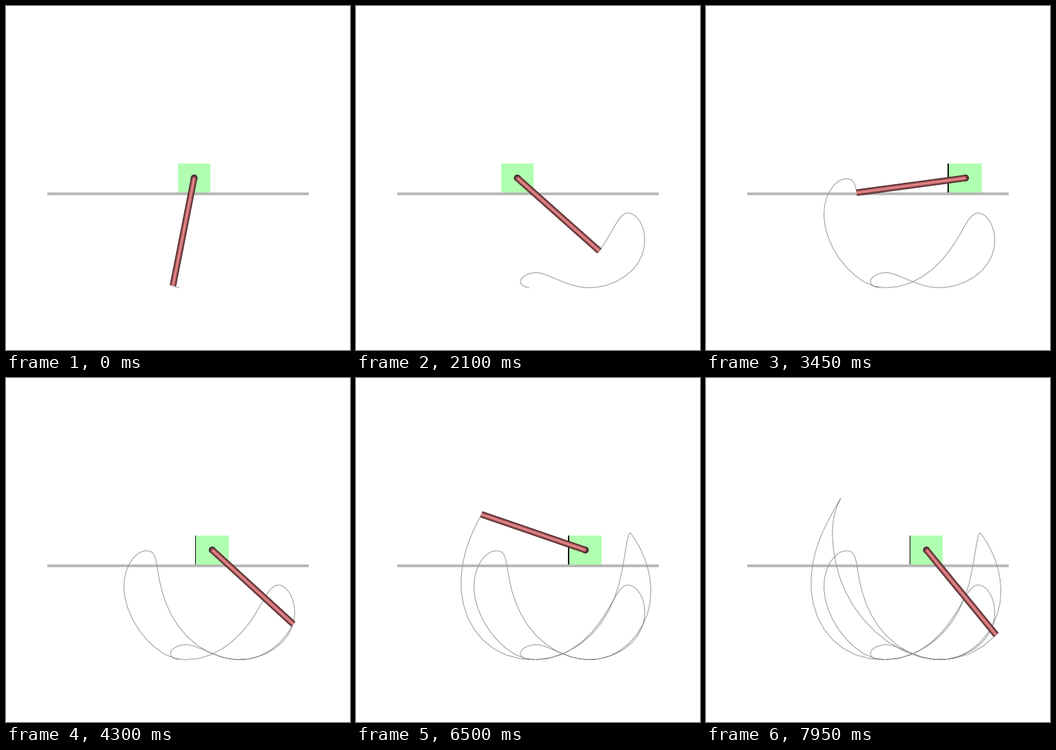
These frames come from a looping animation (500x500 px, 8000 ms). A matplotlib script:

```python
import numpy as np
import matplotlib.pyplot as plt
from matplotlib.animation import FuncAnimation
from matplotlib.patches import Circle, Rectangle

SIZE, DPI = 500, 100
STEP, FRAMES = 50, 160          # ms per frame, frames per loop
PX = 72 / DPI                   # points per pixel
PIVOT_Y, LENGTH = 250, 159.5
CART_W, CART_TOP, CART_H = 47.6, 228.5, 42.5

# the rod hangs straight at each LOW time and turns at each PEAK time (ms)
LOW = [-80, 973, 2393, 4015, 5758, 7765]
PEAK = [505, 1750, 3226, 4937, 6800, 8676]
SWING = np.radians([-30.4, 71.4, -89.6, 99, -118, 120])

# the cart's turns and changes of pace: time in ms, centre in px
CART = np.array([
    (-100, 251), (50, 273.5), (505, 343), (735, 353.3), (1150, 320.5),
    (1750, 244), (1950, 232.5), (2400, 263.5), (2560, 291), (2860, 322),
    (3430, 377), (3900, 352.5), (4290, 301), (4800, 244), (5000, 239.5),
    (5300, 230), (5762, 257), (6500, 333.3), (6800, 336.5), (7115, 338.5),
    (7330, 348), (7650, 350), (7950, 320.5),
])


def rod_angle(t):
    """Pendulum swing: slow near the peaks, slower still for high ones."""
    turns = np.ravel(list(zip(LOW, PEAK)))
    phase = np.interp(t, turns, np.tile([1, 0], len(LOW)))
    i = np.maximum(np.searchsorted(LOW, t, side="right") - 1, 0)
    power = 1.1 + 0.01 * SWING[i] ** 4
    swing = np.cos(np.pi / 2 * phase ** power)
    return 2 * np.arcsin(np.sin(SWING[i] / 2) * swing)


def smooth_path(t, kt, kv):
    """Cubic Hermite curve through the key points."""
    slope = np.gradient(kv, kt)
    i = np.clip(np.searchsorted(kt, t, side="right") - 1, 0, len(kt) - 2)
    h = kt[i + 1] - kt[i]
    u = (t - kt[i]) / h
    return ((1 + 2 * u) * (1 - u) ** 2 * kv[i]
            + u * (1 - u) ** 2 * h * slope[i]
            + u * u * (3 - 2 * u) * kv[i + 1]
            + u * u * (u - 1) * h * slope[i + 1])


times = np.arange(-100, FRAMES * STEP, STEP)
START = int(np.searchsorted(times, 0))
cart_x = smooth_path(times, *CART.T)
angle = rod_angle(times)
tip_x = cart_x + LENGTH * np.sin(angle)
tip_y = PIVOT_Y + LENGTH * np.cos(angle)

fig = plt.figure(figsize=(SIZE / DPI, SIZE / DPI), dpi=DPI, facecolor="white")
ax = fig.add_axes([0, 0, 1, 1])
ax.set_xlim(0, SIZE)
ax.set_ylim(SIZE, 0)
ax.axis("off")


def box(x, y, w, h, color, z):
    return ax.add_patch(Rectangle((x, y), w, h, color=color, lw=0, zorder=z))


def disc(r, color, z):
    return ax.add_patch(Circle((0, 0), r, color=color, lw=0, zorder=z))


box(60, 270.8, 380, 4.5, "#b9b9b9", 1)
cart = box(0, CART_TOP, CART_W, CART_H, "#b0ffb0", 2)
side = box(0, CART_TOP, 0, CART_H, "#101010", 2)
trail, = ax.plot([], [], color="#929292", lw=0.95 * PX, zorder=3)
ball = disc(5, "#3a3030", 4)
cap = disc(3, "#8a4548", 4.5)

# the rod is a stack of ever thinner, lighter strokes
EDGE, CORE = np.array([0.27, 0.13, 0.14]), np.array([0.95, 0.55, 0.56])
rod = [ax.plot([], [], color=EDGE + (CORE - EDGE) * u, lw=(9.4 - 8.4 * u) * PX,
               solid_capstyle="butt", zorder=5)[0]
       for u in np.linspace(0, 1, 9)]


def draw(n):
    i = START + max(n, 1)       # the first pose is held for two steps
    x = cart_x[i]
    left = x - CART_W / 2
    depth = max(0, (x - 275) * 0.022)
    cart.set_x(left)
    side.set_x(left - depth)
    side.set_width(depth)
    trail.set_data(tip_x[:i + 1], tip_y[:i + 1])
    ball.center = cap.center = (x, PIVOT_Y)
    for stroke in rod:
        stroke.set_data([x, tip_x[i]], [PIVOT_Y, tip_y[i]])
    return [cart, side, trail, ball, cap, *rod]


anim = FuncAnimation(fig, draw, frames=FRAMES, interval=STEP,
                     repeat=True, repeat_delay=0, blit=False)
plt.show()
```
